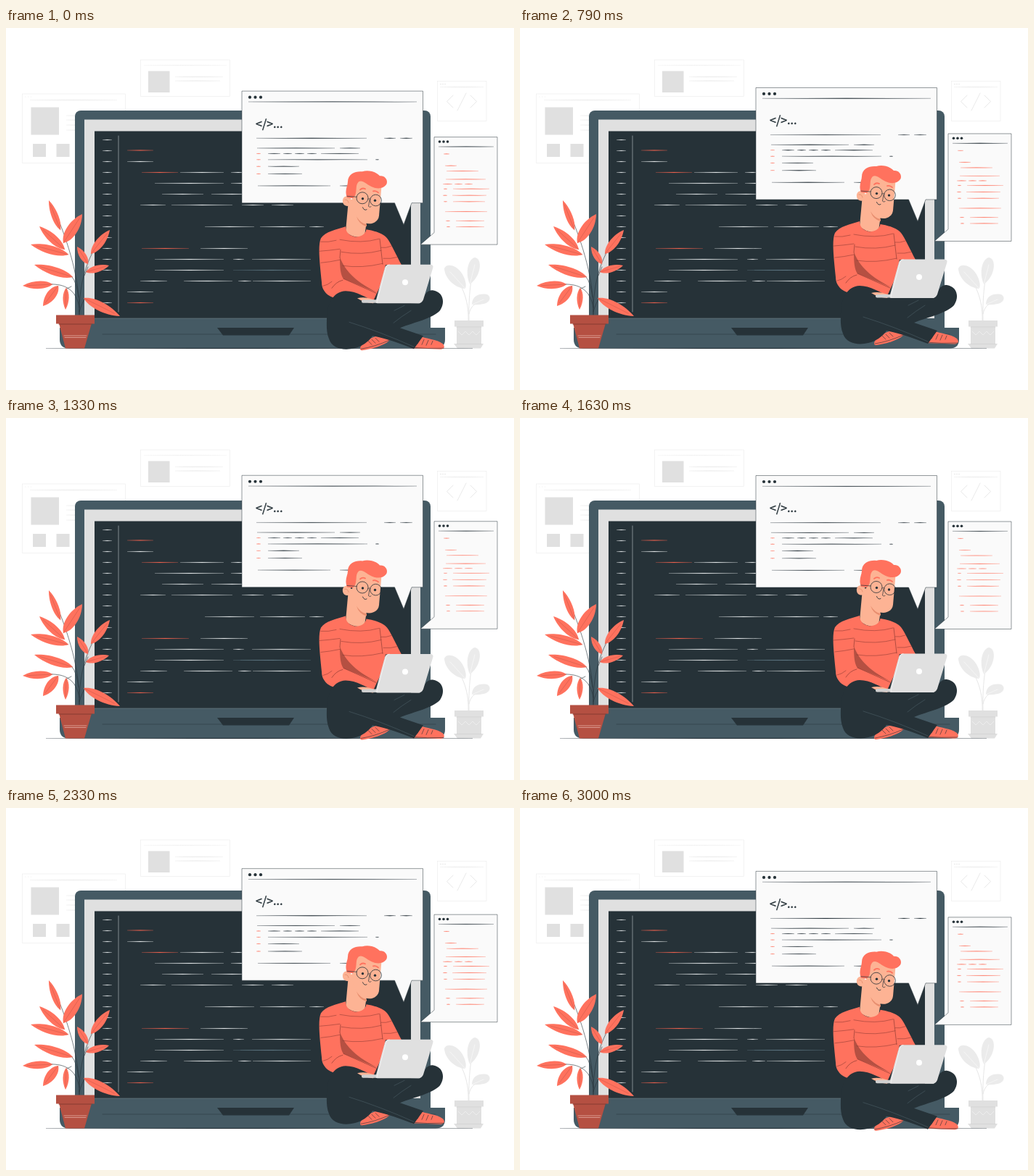
Recreate the animation shown at these times as an HTML page. Size 700 by 500 pixels, loop 3.04 s.

```html
<!DOCTYPE html>
<html lang="en">
<head>
<meta charset="utf-8">
<title>Programmer at work</title>
<style>
  html, body { margin: 0; width: 100%; height: 100%; overflow: hidden; background: #fff; }
  svg { display: block; width: 700px; height: 500px; }
  text { font: 500 16px "Noto Sans CJK JP", "Noto Sans CJK SC", "Noto Sans", sans-serif; }
</style>
</head>
<body>
<svg id="stage" viewBox="0 0 700 500"></svg>
<script>
const DARK = '#263238', SLATE = '#455a64', CORAL = '#ff725e', BRICK = '#b55042',
      SKIN = '#fdb394', PALE = '#ebebeb', GREY = '#e0e0e0', PAPER = '#fafafa';

const fill = (d, color, extra = '') => `<path d="${d}" fill="${color}" ${extra}/>`;
const stroke = (d, color = DARK, w = .6) =>
  `<path d="${d}" fill="none" stroke="${color}" stroke-width="${w}" stroke-linecap="round" stroke-linejoin="round"/>`;
const rect = (x, y, w, h, color, extra = '') =>
  `<rect x="${x}" y="${y}" width="${w}" height="${h}" fill="${color}" ${extra}/>`;
const frame = (x, y, w, h) => rect(x, y, w, h, '#fff', `stroke="${PALE}" stroke-width=".6"`);
const dot = (x, y, r, color = DARK) => `<circle cx="${x}" cy="${y}" r="${r}" fill="${color}"/>`;
const dots = (x, y, gap, r, color) => [0, 1, 2].map(i => dot(x + i * gap, y, r, color)).join('');

// Horizontal hairline that swells in the middle
const dash = (y, a, b, color = DARK, h = .7) => {
  const m = (a + b) / 2;
  return fill(`M${a} ${y}Q${m} ${y - h} ${b} ${y}Q${m} ${y + h} ${a} ${y}Z`, color,
    `stroke="${color}" stroke-width=".2"`);
};
// Row of dashes: y, then pairs of ends
const row = (color, h, y, ...ends) => {
  let s = '';
  for (let i = 0; i < ends.length; i += 2) s += dash(y, ends[i], ends[i + 1], color, h);
  return s;
};

const leaf = (bx, by, tx, ty, w) => {
  const dx = tx - bx, dy = ty - by, len = Math.hypot(dx, dy);
  const px = -dy / len * w, py = dx / len * w;
  const at = (k, s) => `${bx + dx * k + px * s} ${by + dy * k + py * s}`;
  return fill(`M${bx} ${by}C${at(.2, .75)} ${at(.65, .8)} ${tx} ${ty}C${at(.65, -.8)} ${at(.2, -.75)} ${bx} ${by}Z`, CORAL) +
    stroke(`M${bx} ${by}L${at(.85, 0)}`, BRICK, .4);
};

function backWindows() {
  return frame(22.5, 91, 142, 95.5) + dots(27, 95, 3.7, .6, PALE) + dash(99.5, 33, 153, GREY) +
    rect(34.5, 109.5, 38.5, 38, GREY) + rect(37, 160, 18, 18, GREY) + rect(69.5, 160, 18, 18, GREY) +
    [121, 127, 134, 141].map(y => dash(y, 83, 125, GREY)).join('') +
    frame(185.5, 44, 123, 50.5) + dash(51.5, 190, 304, PALE) + rect(196, 59.5, 29.5, 29.5, GREY) +
    dash(67.5, 233, 299, GREY) + dash(73, 233, 295, GREY) +
    frame(594.5, 73.5, 67.5, 55) + dots(599, 77.5, 3, .7, GREY) + dash(81.5, 598, 658, GREY) +
    stroke('M616 93L607.5 101.5L616 110M634 90L622 114M640 93L648.5 101.5L640 110', GREY, .7);
}

function bigLaptop() {
  const light = (y, ...e) => row('#dfe3e5', .8, y, ...e);
  const red = (y, ...e) => row('#e8604f', .9, y, ...e);
  let s = rect(95, 114, 490, 312, SLATE, 'rx="8"') +
    fill('M74 414H605V430Q605 442.5 592 442.5H87Q74 442.5 74 430Z', SLATE) +
    rect(108, 126.5, 463, 274.5, GREY) + rect(122, 142.5, 436, 258.5, DARK) +
    stroke('M122 401H558', '#7b8990', .5) + stroke('M155 149V392', '#aab2b6', .7) +
    stroke('M133 423H592', DARK, .5) + fill('M291 414H397L390 424.5H299Z', DARK);
  for (let i = 0; i < 16; i++) s += light(154.5 + i * 15, 133, 146);
  return s +
    red(169, 167, 203) + light(184.5, 167, 203) +
    red(199.5, 187, 237) + light(199.5, 240, 300, 310, 330) +
    light(214.5, 205, 300, 310, 340) + light(229.5, 215, 272, 283, 340) +
    light(244.5, 185, 220, 228, 312, 325, 355, 366, 396) +
    light(274.5, 274, 342, 350, 412, 418, 438) +
    red(304.5, 187, 252) + light(304.5, 268, 333) +
    light(319.5, 205, 300, 313, 328, 339, 420) +
    light(334.5, 205, 300) + row('#5c7480', .8, 334.5, 313, 420) +
    light(349.5, 185, 222, 245, 312, 320, 338, 340, 420) +
    light(364.5, 167, 203) + red(379.5, 167, 203);
}

function redPlant() {
  return stroke('M101 396C102 350 88 300 64 245M101 396C100 350 114 308 138 284') +
    stroke('M101 386C97 362 82 353 60 354M101 392Q105 378 109 374M100 372Q97 350 91 344M113 330L108 342M84 360L90 357') +
    leaf(75, 279, 59, 238, 8) + leaf(79, 297, 105, 257, 13) + leaf(81, 306, 46, 274, 10) +
    leaf(86, 313, 34, 299, 10) + leaf(92, 344, 39, 327, 10) + leaf(64, 354, 23, 356, 9) +
    leaf(72, 356, 51, 384, 11) + leaf(83, 359, 82, 389, 7) + leaf(117, 312, 143, 279, 10) +
    leaf(113, 326, 98, 302, 8) + leaf(110, 337, 142, 328, 8) + leaf(107, 373, 157, 398, 11) +
    fill('M73 408H118L108 442.5H82Z', BRICK) + rect(69, 396.5, 53, 12, BRICK) +
    stroke('M73 409H118', '#7a362d', .8) + stroke('M80 425H111M81 427.5H110', '#f4c9c1', .6);
}

function palePlant() {
  return stroke('M638 404C637 375 640 350 645 325M637 404C638 375 628 352 612 336M638 395C640 384 648 378 660 374', GREY, .8) +
    fill('M633 360C617 359 604 344 604 332C607 324 620 328 626 336C633 345 635 354 633 360Z', PALE) +
    fill('M639 354C632 337 637 319 646 317C657 318 655 343 639 354Z', PALE) +
    fill('M642 382C642 370 652 366 663 368C670 372 666 380 658 381Q650 383 642 382Z', PALE) +
    stroke('M633 360L612 337M639 354L646 327M642 382L658 375', '#fff', .5) +
    rect(621, 412, 34, 25, GREY) + rect(618, 404, 40, 8.5, GREY) +
    fill('M617 436H658L654 442.5H622Z', GREY) + stroke('M621 413H655M621 436.5H655', '#cfcfcf', .6) +
    stroke('M623 419L628 424L633 419L638 424L643 419L648 424L653 419', '#f5f5f5', .6);
}

function bubbles() {
  const ink = (y, ...e) => row(DARK, .8, y, ...e);
  const red = (y, ...e) => row(CORAL, .7, y, ...e);
  const edge = `stroke="${DARK}" stroke-width=".5"`;
  return fill('M325 87.5H574.5V242H559L548 272L535.5 242H325Z', PAPER, edge) +
    dots(336, 96, 7.5, 2.1) + ink(102.3, 334, 566) +
    `<text x="344" y="138.3" fill="${DARK}" stroke="${DARK}" stroke-width=".4">&lt;/&gt;...</text>` +
    ink(152.6, 345, 497, 521, 537, 543, 560) + ink(166.3, 346, 453, 460, 488) +
    ink(173.8, 361, 378, 382, 394, 398, 411, 415, 428, 434, 486) +
    ink(182.2, 361, 498, 509, 514) + ink(191.5, 361, 404) + ink(201.8, 361, 408) +
    ink(218.3, 347, 447, 460, 488) +
    [173.8, 182.2, 191.5, 201.8].map(y => red(y, 345, 351)).join('') +
    fill('M590 151H677V299.5H571L590 283Z', PAPER, edge) +
    dots(597.5, 157.3, 5.5, 1.8) + ink(164.3, 596, 672) +
    red(174.3, 603, 611) + red(190.5, 605, 621) + red(198, 607, 651) + red(209.3, 606, 661) +
    red(216, 602, 615, 618, 629, 632, 643) + red(222.5, 603, 608, 616, 666) +
    red(231.5, 602, 608, 615, 662) + red(240.2, 603, 608, 616, 660) +
    red(254, 605, 663) + red(266.7, 606, 612, 620, 659) + red(275, 607, 612, 620, 659);
}

function person() {
  const head =
    fill('M472 238L468 282Q480 293 494 288L497 268L485 236Z', SKIN) +
    fill('M483 261Q489 271 497 272L497 275Q486 272 483 261Z', '#e88f70') +
    fill('M475 234C468 231 463 235 464 241C465 247 471 248 475 245Z', SKIN) +
    stroke('M467 238Q471 237 472 242', '#d9805f') +
    fill('M476 210H508L517.5 219L514 260C513 269 503 273 495 270C487 267 481 261 478 250Z', SKIN) +
    fill('M470 235C466 225 471 219 471 213C471 202 482 198 491 199C500 196 511 200 515 205C523 204 527 212 524 217C519 224 509 223 502 219C496 216 491 210 486 213C481 218 484 225 481 232L478 236Z', CORAL) +
    stroke('M488 224Q491 221 495 223M506 226Q510 225 513 228', CORAL, 1.8) +
    `<g fill="none" stroke="${DARK}" stroke-width=".8"><circle cx="491" cy="235.5" r="8"/><circle cx="509.5" cy="238.7" r="7.8"/></g>` +
    stroke('M483 234L470 233M499 237Q500.5 235.5 502 237', DARK, .7) +
    dot(491.5, 236.5, 1.7) + dot(508.5, 239, 1.7) +
    stroke('M501 238L499.5 247Q501 249 503 247.5', DARK, .7) +
    stroke('M491.5 248.5Q493.5 253.5 497 251.5', DARK, .9);

  const sweater =
    fill('M468 275C455 279 440 282 434 291C429 302 433 330 435 352C435 366 447 373 455 374L505 380L518 352L523 328H545C538 315 530 297 525 291C519 284 508 281 496.5 279C495 287 487 290 480 289C472 287 468 282 468 275Z', CORAL) +
    fill('M460 317C460 332 461 342 465 347L511 366C486 353 468 339 460 317Z', BRICK) +
    stroke('M461 307L460 318M465 347L510 367M515 292L519 327M449 360Q455 351 464 349', '#7d352e') +
    stroke('M434 296Q444 297 455 294M460 293Q490 299 514 292M432 309Q446 308 460 306M462 310Q490 315 517 308M434 325Q446 324 460 321M464 329Q490 333 519 326M437 357Q443 356 449 351M517 304Q523 305 531 302M520 319Q530 320 540 317', '#7d352e', .5);

  const legs =
    fill('M442 402C443 380 451 365 468 364C483 364 496 373 510 380L570 381C577 373 577 363 588 363C602 365 606 379 598 391C588 402 563 407 543 415L575 426L562 444C545 437 522 429 505 426C500 434 490 441 480 443C465 447 449 443 445 430C441 420 442 410 442 402Z', DARK) +
    stroke('M473 407Q515 420 562 441M535 391L549 384M534 408Q545 399 558 391', '#53676f', .5);

  const feet =
    fill('M488 444C488 436 501 428 519 424L531 429C526 438 506 444 491 446Q488 446 488 444Z', CORAL) +
    fill('M559 443L567 425C580 431 593 430 602 437C606 442 603 444.5 598 444.5Z', CORAL) +
    stroke('M489 444Q508 441 528 432M499 433L504 438M504 431L509 436M509 429L514 434M560 442Q580 444 603 443M571 429L567 437M576 431L573 438M582 432L579 439M588 433L586 438', DARK);

  const laptop =
    fill('M484 374Q495 371 509 377L506 381Q493 380 484 374Z', SKIN) +
    rect(490, 376, 60, 4.5, '#d0d0d0', 'rx="2"') +
    fill('M527 327.5H585Q590 328 588 333L575 376Q573 381 568 381H512Q508 381 510 376L522 332Q523 328 527 327.5Z', GREY) +
    stroke('M511 380L524 330Q525 328 528 327.7', '#f4f4f4', .8) + dot(550, 352, 4, '#fff');

  return head + sweater + feet + legs + laptop;
}

document.getElementById('stage').innerHTML =
  backWindows() + bigLaptop() + palePlant() +
  dash(442.5, 55, 643, DARK, .9) + redPlant() +
  `<g id="bubbles">${bubbles()}</g><g id="person">${person()}</g>`;

const LOOP = 3040, RISE = 9, LEAD = 60;
const lift = (t, period) => -RISE * (1 - Math.abs(1 - 2 * (t % period) / period));
const move = (id, y) => document.getElementById(id).setAttribute('transform', `translate(0 ${y.toFixed(2)})`);

const start = performance.now();
function draw() {
  const t = Math.max(0, performance.now() - start) + LEAD;
  move('bubbles', lift(t, LOOP));
  move('person', lift(t, LOOP / 2));
  requestAnimationFrame(draw);
}
draw();
</script>
</body>
</html>
```
